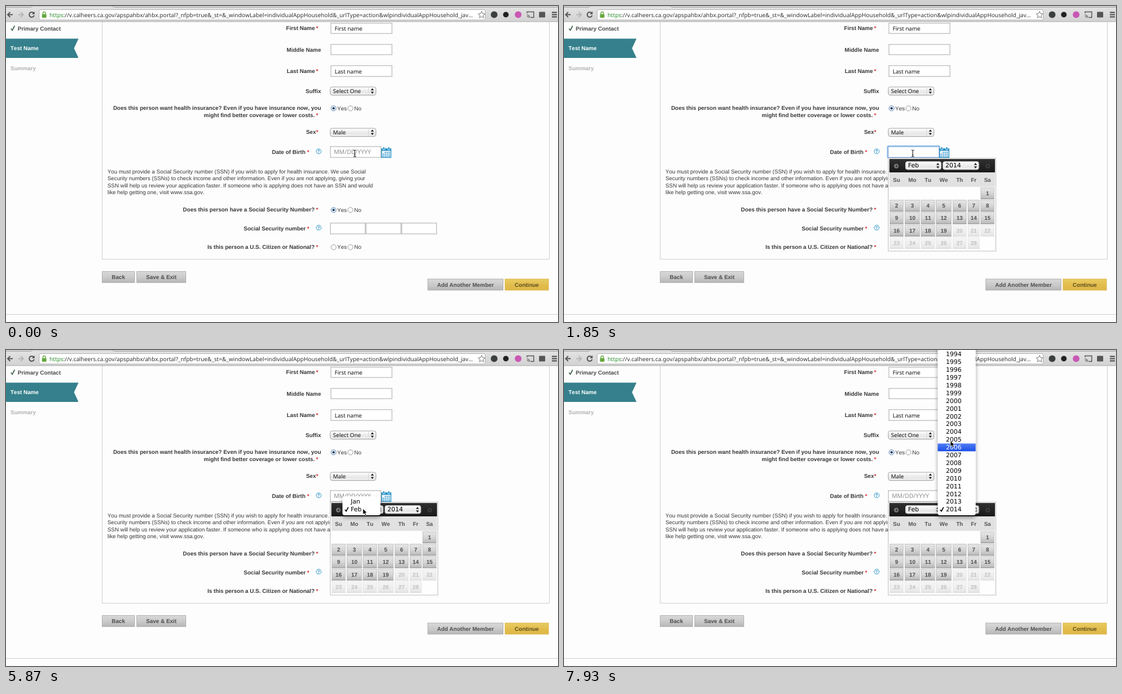
Write an HTML page that moves like this. It is 990 px wide and 566 px high and loops after 8000 ms.

```html
<!DOCTYPE html>
<html lang="en">
<head>
<meta charset="utf-8">
<title>Household application form</title>
<style>
html, body { margin: 0; width: 100%; height: 100%; overflow: hidden; background: #fdfdfd; }
svg { display: block; width: 990px; height: 566px; }
text {
  font: 10px "Liberation Sans", Arial, sans-serif; font-kerning: none; fill: #383838;
  text-rendering: geometricPrecision; white-space: pre;
}
.b { font-weight: bold; }
.end { text-anchor: end; }
.mid { text-anchor: middle; }
.ui { font-family: "Noto Sans", "Open Sans", sans-serif; fill: #111; }
.menu { font: 11px "DejaVu Sans", sans-serif; fill: #000; }
</style>
</head>
<body>
<svg id="stage" viewBox="0 0 990 566" xmlns="http://www.w3.org/2000/svg"></svg>
<script>
const LOOP = 8000;
const BLUE = '#2b93c8';

const rect = (x, y, w, h, fill, more = '') =>
  `<rect x="${x}" y="${y}" width="${w}" height="${h}" fill="${fill}" ${more}/>`;
const path = (d, fill, more = '') => `<path d="${d}" fill="${fill}" ${more}/>`;
const stroke = (d, color, width = 1, more = '') =>
  path(d, 'none', `stroke="${color}" stroke-width="${width}" ${more}`);
const circle = (x, y, r, fill, more = '') => `<circle cx="${x}" cy="${y}" r="${r}" fill="${fill}" ${more}/>`;
const text = (x, y, s, cls = '', more = '') =>
  `<text x="${x}" y="${y}" class="${cls}" ${more}>${s.replace(/&/g, '&amp;')}</text>`;
const group = (id, body, more = '') => `<g id="${id}" ${more}>${body}</g>`;
const gradient = (id, ...stops) => `<linearGradient id="${id}" x2="0" y2="1">${stops.map((c, i) =>
  `<stop offset="${i / (stops.length - 1)}" stop-color="${c}"/>`).join('')}</linearGradient>`;

const defs = `<defs>
  ${gradient('bar', '#e4e4e4', '#d2d2d2')}
  ${gradient('pick', '#ffffff', '#f2f2f2', '#e6e6e6', '#f4f4f4')}
  ${gradient('btn', '#d8d8d8', '#cbcbcb', '#b6b6b6')}
  ${gradient('gold', '#e9cb62', '#e3be4d', '#dfb645')}
  ${gradient('cell', '#e6e6e6', '#d6d6d6', '#b9b9b9')}
  ${gradient('head', '#303030', '#191919')}
  ${gradient('hot', '#4f7df5', '#1c4fe8')}
  <filter id="shade" x="-20%" y="-20%" width="140%" height="150%">
    <feDropShadow dx="0" dy="4" stdDeviation="3.5" flood-opacity=".4"/></filter>
  <filter id="blur" x="-10%" y="-40%" width="120%" height="180%"><feGaussianBlur stdDeviation=".7"/></filter>
</defs>`;

const required = (x, y) => text(x, y, '*', 'b', 'style="fill:#d9302c"');
const label = (s, y, end = 565, star = 0) =>
  text(end, y, s, 'b end') + (star ? required(star, y) : '');

const input = (x, y, w, h) => rect(x + .75, y + .75, w - 1.5, h - 1.5, '#fff', 'stroke="#c4c4c4" stroke-width="1.5"');

const spinner = (x, y) =>
  path(`M${x - 2.7} ${y - 1.3}h5.4l-2.7 -3.7zM${x - 2.7} ${y + 1.3}h5.4l-2.7 3.7z`, '#222');

const select = (x, y, w, s) => rect(x + .5, y + 1.5, w - 1, 14.5, '#bbb', 'rx="4" opacity=".5"') +
  rect(x + .5, y + .5, w - 1, 14.5, 'url(#pick)', 'rx="3.5" stroke="#a2a2a2"') +
  stroke(`M${x + w - 13.5} ${y + 2}v12`, '#d8d8d8') +
  text(x + 5.5, y + 11.3, s, 'ui') + spinner(x + w - 7, y + 7.8);

const headSelect = (x, w, s) => rect(x + .5, 278.5, w - 1, 14.5, 'url(#pick)', 'rx="3.5" stroke="#b4b4b4"') +
  text(x + 5, 289, s, 'menu') + spinner(x + w - 6.5, 286);

const radio = (x, y, on) => circle(x, y, 4.6, on ? '#dcebf9' : '#fafafa', `stroke="${on ? '#6688ad' : '#9a9a9a'}"`) +
  (on ? circle(x, y, 2, '#1c2f4a') : '');
const yesNo = (y, on) => radio(587.5, y + .3, on) + text(594, y + 3.5, 'Yes') +
  radio(617.7, y + .3, false) + text(624.5, y + 3.5, 'No');

const help = y => circle(560.8, y, 4.4, '#fff', `stroke="${BLUE}"`) +
  text(560.8, y + 3, '?', 'b mid', `style="font-size:8px;fill:${BLUE}"`);

const button = (x, y, w, s, fill = 'url(#btn)', edge = '#b0b0b0', color = '#4d4d4d') =>
  rect(x + .5, y + .5, w - 1, 20, fill, `stroke="${edge}"`) +
  text(x + w / 2, y + 14, s, 'b mid', `style="fill:${color}"`);

const tick = (x, y, color, k = 1) =>
  stroke(`M${x} ${y}l${2.4 * k} ${3 * k}L${x + 6.5 * k} ${y - 5 * k}`, color, 1.7);

function toolbar() {
  const url = 'https://v.calheers.ca.gov/apspahbx/ahbx.portal?_nfpb=true&_st=&_windowLabel=individualAppHousehold' +
    '&_urlType=action&wlpindividualAppHousehold_jav…';
  const split = url.indexOf(':');
  const esc = s => s.replace(/&/g, '&amp;');
  return rect(0, 0, 990, 28, 'url(#bar)') + rect(0, 0, 990, 2, '#d0d0d0') +
    stroke('M0 2.5H44L48 0M190 0L195 2.5H990', '#a8a8a8') +
    stroke('M0 28H990', '#a9a9a9') +
    stroke('M12 15.5H3M7.5 11L3 15.5L7.5 20', '#555', 2) +
    stroke('M22 15.5H31M26.5 11L31 15.5L26.5 20', '#b5b5b5', 2) +
    stroke('M49.6 12.6A4.5 4.5 0 1 0 50.5 16.8', '#505050', 2) + path('M51.3 9.7v5h-5z', '#505050') +
    rect(59.5, 6.5, 800, 18.5, '#fff', 'rx="2.5" stroke="#b3b3b3"') +
    rect(64.5, 14.5, 8, 6.5, '#66a83e', 'rx="1"') + stroke('M66.2 15V12.8a2.3 2.3 0 0 1 4.6 0V15', '#66a83e', 1.4) +
    `<text x="78" y="19.5" class="ui" style="font-size:10.2px;fill:#333"><tspan style="fill:#2f8f2f">${
      url.slice(0, split)}</tspan>${esc(url.slice(split))}</text>` +
    path('M853 9.5l1.8 4.1 4.4.4-3.4 2.9 1.1 4.4-3.9-2.4-3.9 2.4 1.1-4.4-3.4-2.9 4.4-.4z', '#fff', 'stroke="#777"') +
    circle(875.5, 15.5, 6, '#3b3f3e') + circle(896.5, 15.5, 5, '#222') + circle(918.5, 15.5, 6, '#c958b4') +
    stroke('M934.5 13V10.5H946.5V20.5H941', '#555', 1.5) +
    stroke('M934 15.5a5.5 5.5 0 0 1 5.5 5.5M934 18a3 3 0 0 1 3 3', '#555', 1.2) +
    rect(956, 10.5, 11, 10, '#555', 'rx="1"') +
    stroke('M979 11.5h9M979 15.5h9M979 19.5h9', '#444', 2);
}

function form() {
  const notice = [
    'You must provide a Social Security number (SSN) if you wish to apply for health insurance. We use Social',
    'Security numbers (SSNs) to check income and other information. Even if you are not applying, giving your',
    'SSN will help us review your application faster. If someone who is applying does not have an SSN and would',
    'like help getting one, visit www.ssa.gov.'];
  return stroke('M172.5 28V453.5H974.5V28', '#cdcdcd') + stroke('M0 552.5H990', '#cfcfcf') +
    tick(9, 40.5, '#3f5f45') + text(21, 44, 'Primary Contact', 'b', 'style="fill:#4a4a4a"') +
    path('M0 58.5H130L122 75.7L130 93H0z', '#35808c') +
    text(8, 79.3, 'Test Name', 'b', 'style="fill:#fff"') +
    text(8, 114.6, 'Summary', 'b', 'style="fill:#b2b2b2"') +
    label('First Name', 43.3, 554, 556) + input(582, 30, 111, 20) + text(589.5, 44, 'First name', 'ui') +
    label('Middle Name', 81.5) + input(582, 68, 111, 20) +
    label('Last Name', 119.7, 554, 556) + input(582, 106, 111, 21) + text(589.5, 120.5, 'Last name', 'ui') +
    label('Suffix', 155.8) + select(581, 144.5, 83, 'Select One') +
    label('Does this person want health insurance? Even if you have insurance now, you', 186.3) +
    label('might find better coverage or lower costs.', 198.8, 553.7, 556) + yesNo(183, true) +
    label('Sex', 229.3, 556, 556.3) + select(581, 218.5, 83, 'Male') +
    label('Date of Birth', 264.8, 537, 540) + help(260.3) + input(581, 251, 92, 21) +
    notice.map((s, i) => text(182, 299.5 + i * 12.5, s, '', 'style="font-size:9.9px"')).join('') +
    label('Does this person have a Social Security Number?', 368.3, 553.5, 556) + yesNo(365, true) +
    label('Social Security number', 401.5, 537.5, 540) + help(397) +
    [581, 645, 709].map(x => input(x, 388, 64, 21)).join('') +
    label('Is this person a U.S. Citizen or National?', 435, 553.5, 556) + yesNo(431.7, false) +
    button(172, 475, 59, 'Back') + button(234, 475, 89, 'Save & Exit') +
    button(756, 488.5, 136, 'Add Another Member') +
    button(894.5, 488.5, 79, 'Continue', 'url(#gold)', '#dcb851', '#5d5023');
}

function calendarIcon() {
  let dots = '';
  for (let n = 1; n <= 11; n++) {
    dots += rect(675.6 + n % 4 * 3.5, 261.3 + Math.floor(n / 4) * 3.2, 2.2, 2, BLUE);
  }
  return rect(673.7, 255.7, 16.6, 15.6, '#fff', `stroke="${BLUE}" stroke-width="1.5"`) +
    rect(673, 255, 18, 4.5, BLUE) + rect(676, 252.5, 3, 5, BLUE, 'stroke="#fff" stroke-width=".7"') +
    rect(685, 252.5, 3, 5, BLUE, 'stroke="#fff" stroke-width=".7"') + dots;
}

function datePicker() {
  const left = [584, 611, 640, 667, 697, 724, 747];
  const right = [609, 638.5, 665.5, 695, 722, 745.5, 772];
  const center = i => (left[i] + right[i]) / 2;
  let out = rect(581.5, 272.5, 193, 166.5, '#fefefe', 'stroke="#bdbdbd"') +
    rect(583.5, 274, 189.5, 24, 'url(#head)') + rect(583.5, 298, 189.5, 26, '#e1e1e1') +
    circle(596, 286.8, 4.2, '#777') + path('M597.3 284.5v4.6l-3-2.3z', '#222') +
    circle(760, 286.8, 4.2, '#3b3b3b') + path('M758.8 284.5v4.6l3-2.3z', '#1c1c1c');
  ['Su', 'Mo', 'Tu', 'We', 'Th', 'Fr', 'Sa'].forEach((d, i) => {
    out += text(center(i), 314.6, d, 'b mid', 'style="fill:#555"');
  });
  for (let day = 1; day <= 28; day++) {
    const slot = day + 5, col = slot % 7, y = 325 + Math.floor(slot / 7) * 22.2;
    out += `<g opacity="${day > 19 ? .35 : 1}">` +
      rect(left[col] + .5, y + .5, right[col] - left[col] - 1, 20, 'url(#cell)', 'stroke="#c2c2c2"') +
      stroke(`M${left[col]} ${y + 20.5}H${right[col]}`, '#8d8d8d') +
      text(center(col), y + 14, String(day), 'b mid', 'style="fill:#4f4f4f"') + '</g>';
  }
  const ring = rect(611, 277, 67, 17.5, 'none', 'rx="4.5" stroke="#6fa8e6" stroke-width="2.5"');
  return out + headSelect(612, 65, 'Feb') + headSelect(679, 65.5, '2014') + group('ring', ring);
}

// A pop-up list whose last row is the current value.
const ROW = 13.9, LAST = 285.3;
function list(id, x, top, items) {
  const rows = items.map((s, i) => {
    const mid = LAST - (items.length - 1 - i) * ROW;
    return `<g data-item="${s}">${rect(x, mid - 6.6, 68, ROW, 'url(#hot)', 'class="hot"')}${
      text(x + 14.7, mid + 4, s, 'menu')}</g>`;
  }).join('');
  return group(id, rect(x, top, 68, 296 - top, '#fff', 'rx="4" filter="url(#shade)"') + rows +
    group(id + 'Tick', tick(x + 4.5, LAST + .8, '#000', .9)));
}
const years = Array.from({ length: 22 }, (_, i) => String(1993 + i));

const dateField = group('hint', text(588, 265.3, 'MM/DD/YYYY', 'ui', 'style="font-size:10.6px;fill:#8d8d8d"')) +
  group('focus', rect(580.5, 251, 93, 21, '#fff', 'rx="1" stroke="#8fbdec" stroke-width="2.5" filter="url(#blur)"') +
    rect(581.5, 252, 91, 19, '#fff', 'stroke="#7fa9d6"'));
const caret = group('caret', stroke('M588.5 255.5V267.5', '#111'));

const pointers =
  group('beam', stroke('M-2.5 -6Q0 -6 0 -4.5Q0 -6 2.5 -6M0 -5V5M-2.5 6Q0 6 0 4.5Q0 6 2.5 6M-1.3 2.5H1.3', '#222', 1.1)) +
  group('arrow', path('M0 0V10.6L2.5 8.4L4.2 12.4L6.2 11.5L4.5 7.7H7.8z', '#000', 'stroke="#fff" stroke-width=".9"'));

document.getElementById('stage').innerHTML = defs + rect(0, 0, 990, 566, '#fdfdfd') + form() + toolbar() +
  dateField + caret + calendarIcon() + group('picker', datePicker()) +
  list('month', 603.5, 262, ['Jan', 'Feb']) + list('year', 670.3, -10, years) + pointers;

// Each step changes only the properties it names.
const steps = [
  [0, { picker: 0, focus: 0, caret: 0, ring: 0, menu: '', hot: '', pointer: 'beam', at: [625.5, 264] }],
  [150, { picker: .5, focus: 1, caret: 1 }],
  [360, { picker: 1 }],
  [960, { caret: 0 }],
  [1400, { caret: 1 }],
  [1850, { caret: 0 }],
  [2450, { caret: 1 }],
  [2900, { caret: 0 }],
  [3340, { caret: 1, at: [627, 266] }],
  [3490, { pointer: 'arrow', at: [634, 277] }],
  [3640, { at: [639, 285] }],
  [3790, { at: [640, 286.5] }],
  [3930, { focus: 0, caret: 0, menu: 'month', hot: 'Feb' }],
  [4380, { at: [639.5, 281] }],
  [4530, { hot: 'Jan', at: [639, 276.5] }],
  [4830, { at: [639, 278] }],
  [4980, { hot: 'Feb', at: [640, 284] }],
  [5870, { hot: '' }],
  [6020, { menu: '', ring: 1, at: [641, 285] }],
  [6170, { at: [650, 286] }],
  [6310, { at: [669, 288] }],
  [6460, { at: [690, 288] }],
  [6600, { at: [699.5, 287] }],
  [6750, { ring: 0, menu: 'year', hot: '2014' }],
  [7640, { hot: '2013', at: [699, 273] }],
  [7790, { hot: '2010', at: [697, 226] }],
  [7930, { hot: '2006', at: [693, 162.5] }]
];

const el = id => document.getElementById(id);
const show = (node, on) => { node.style.display = on ? '' : 'none'; };
const rows = [...document.querySelectorAll('[data-item]')];

function draw(t) {
  const s = Object.assign({}, ...steps.filter(([at]) => at <= t).map(([, change]) => change));
  el('picker').style.opacity = s.picker;
  for (const id of ['focus', 'caret', 'ring']) show(el(id), s[id]);
  show(el('hint'), !s.focus);
  for (const row of rows) {
    const on = row.dataset.item === s.hot;
    show(row.querySelector('.hot'), on);
    row.querySelector('text').style.fill = on ? '#fff' : '#000';
  }
  const current = s.hot === 'Feb' || s.hot === '2014';
  for (const id of ['month', 'year']) {
    show(el(id), s.menu === id);
    el(id + 'Tick').firstElementChild.setAttribute('stroke', current ? '#fff' : '#000');
  }
  for (const id of ['beam', 'arrow']) {
    show(el(id), s.pointer === id);
    el(id).setAttribute('transform', `translate(${s.at})`);
  }
}

const start = performance.now();
function animate() {
  draw((performance.now() - start) % LOOP);
  requestAnimationFrame(animate);
}
animate();
</script>
</body>
</html>
```
